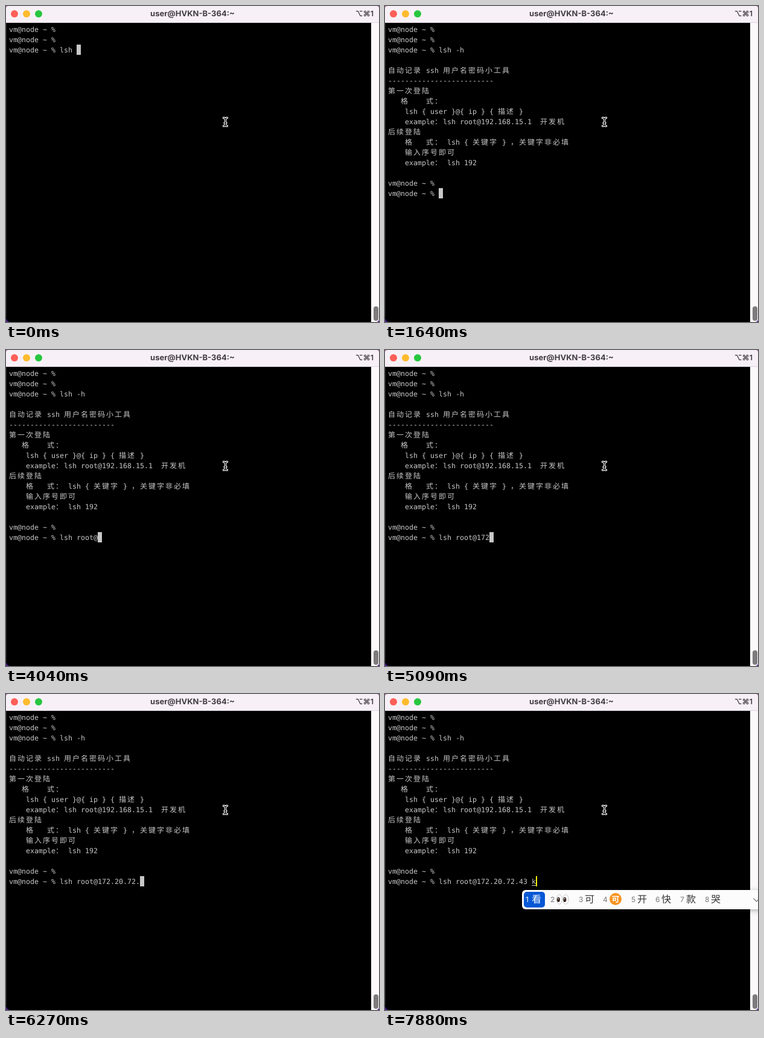
Recreate the animation shown at these times as an HTML page. Size 618 by 524 pixels, loop 8000 ms.

```html
<!DOCTYPE html>
<html lang="zh-CN">
<head>
<meta charset="utf-8">
<title>Terminal</title>
<style>
  html, body { margin: 0; width: 100%; height: 100%; overflow: hidden; background: #000; }
  svg { display: block; }
  text { white-space: pre; text-rendering: geometricPrecision; text-spacing-trim: space-all; }
  .term { font: 11.63px "DejaVu Sans Mono", monospace; fill: #c7c7c7; }
  .wide { font: 12px "Noto Sans CJK SC", "Noto Sans CJK", sans-serif; letter-spacing: 2px; }
  .title { font: 700 13px Inter, sans-serif; fill: #413d42; }
  .keys { font: 600 12.5px Inter, "DejaVu Sans", sans-serif; fill: #413d42; }
  .num { font: 12px Inter, sans-serif; fill: #77777a; }
  .word { font: 16px "Noto Sans CJK SC", "Noto Sans CJK", sans-serif; fill: #343436; }
  .picked { fill: #fff; }
  .popup { filter: drop-shadow(0 2px 4px rgba(0, 0, 0, .3)); }
</style>
</head>
<body>
<svg width="618" height="524" viewBox="0 0 618 524">
  <rect width="618" height="28" fill="#a44ba8"/>
  <rect y="28" width="618" height="496" fill="#4b1c93"/>
  <path d="M0 4Q0 0 4 0H614Q618 0 618 4V28H0Z" fill="#f8f0f7"/>
  <path d="M0 28H605V524H8Q0 524 0 515Z"/>
  <path d="M0.5 28V515" stroke="#242424"/>
  <path d="M0 27.5H618" stroke="#ddd5dc"/>
  <path d="M605 28H618V520Q617 524 613 524H605Z" fill="#fcf9fb"/>
  <rect x="609" y="498" width="8" height="24" rx="4" fill="#7d7b7d"/>
  <circle cx="14" cy="13" r="6" fill="#ff5f57"/>
  <circle cx="34" cy="13" r="6" fill="#febb2e"/>
  <circle cx="54" cy="13" r="6" fill="#28c63f"/>
  <text class="title" x="309" y="17" text-anchor="middle">user@HVKN-B-364:~</text>
  <text class="keys" x="609" y="16.5" text-anchor="end">⌥⌘1</text>

  <g id="screen" class="term"></g>
  <g id="help" class="term"></g>
  <g id="last" class="term"></g>
  <rect id="cursor" width="7" height="17" fill="#c7c7c7"/>

  <g id="ime">
    <path d="M243 317.5h7" stroke="#c7c7c7"/>
    <rect x="250" y="302" width="2" height="17" fill="#fdf800"/>
    <g class="popup">
      <rect x="227" y="325" width="410" height="32" rx="6" fill="#fdfcfd"/>
    </g>
    <rect x="230" y="328" width="35" height="26" rx="5" fill="#0758d6"/>
    <g id="choices"></g>
    <g id="eyes"></g>
    <path d="M610.500 339l5 5 5-5" fill="none" stroke="#858387" stroke-width="1.300"/>
  </g>

  <g fill="none" stroke-linecap="round">
    <path id="beam" d="M360.500 185.500Q363.500 185.500 363.500 188.500Q363.500 185.500 366.500 185.500M363.500 188V196M360.500 199Q363.500 199 363.500 196Q363.500 199 366.500 199M362 194H365" stroke="#fff" stroke-width="3.400"/>
    <use href="#beam" id="beamCore"/>
  </g>
</svg>
<script>
const NS = 'http://www.w3.org/2000/svg';
const LOOP = 8000, LEFT = 5, TOP = 30, CELL = 7, ROW = 17;
const PROMPT = 'vm@node ~ % ';
const $ = id => document.getElementById(id);

function add(parent, tag, attrs, text = '') {
  const node = document.createElementNS(NS, tag);
  for (const key in attrs) node.setAttribute(key, attrs[key]);
  node.textContent = text;
  return parent.appendChild(node);
}

// Wide characters take two cells of the terminal grid.
function print(parent, row, text) {
  const line = add(parent, 'text', { y: TOP + ROW * row + 13 });
  let cell = 0;
  for (const run of text.match(/[\u2e80-\uffef]+|[^\u2e80-\uffef]+/g) || []) {
    const wide = /[\u2e80-\uffef]/.test(run);
    add(line, 'tspan', { x: LEFT + CELL * cell, class: wide ? 'wide' : 'narrow' }, run);
    cell += run.length * (wide ? 2 : 1);
  }
  return line;
}

print($('screen'), 0, PROMPT);
print($('screen'), 1, PROMPT);
const first = print($('screen'), 2, PROMPT).firstChild;
[
  '自动记录 ssh 用户名密码小工具',
  '-'.repeat(25),
  '第一次登陆',
  '   格    式：',
  '    lsh { user }@{ ip } { 描述 }',
  '    example：lsh root@192.168.15.1  开发机',
  '后续登陆',
  '    格   式： lsh { 关键字 } ，关键字非必填',
  '    输入序号即可',
  '    example： lsh 192',
  '',
  PROMPT
].forEach((text, i) => print($('help'), 4 + i, text));
const second = print($('last'), 16, PROMPT).firstChild;

// Candidate list; the second and fourth entries are pictures.
const numberX = [233, 274, 321, 361, 408, 448, 489, 530];
[...'看 可 开快款哭'].forEach((word, i) => {
  const x = numberX[i], picked = i ? '' : ' picked';
  add($('choices'), 'text', { x, y: 345, class: 'num' + picked }, i + 1);
  add($('choices'), 'text', { x: x + 10, y: 346, class: 'word' + picked }, word);
});
add($('choices'), 'circle', { cx: 382, cy: 340, r: 10, fill: '#f7931e' });
add($('choices'), 'text', { x: 382, y: 345, class: 'word picked', 'text-anchor': 'middle', style: 'font-size:13px;font-weight:700' }, '可');
for (const x of [289, 299.5]) {
  add($('eyes'), 'ellipse', { cx: x, cy: 340.5, rx: 4.6, ry: 8, fill: '#fff', stroke: '#b9b9bd', 'stroke-width': .8 });
  add($('eyes'), 'ellipse', { cx: x - 1.6, cy: 341, rx: 2.5, ry: 4, fill: '#38251f' });
  add($('eyes'), 'circle', { cx: x - 2, cy: 339.3, r: .9, fill: '#fff' });
}
$('beamCore').remove();
add($('beam').parentNode, 'path', { d: $('beam').getAttribute('d'), stroke: '#000', 'stroke-width': 1.2 });

// One time per typed character.
const helpKeys = [0, 0, 0, 0, 600, 890];
const loginKeys = [
  2390, 2540, 2840, 3140, 3440, 3590, 3590, 3740, 4040, 4640, 4790,
  5090, 5240, 5390, 5530, 5680, 5830, 5980, 6270, 6420, 6570, 6720
];
const HELP_AT = 1040, ENTER_AT = 1640, IME_AT = 7880;
const typed = (text, keys, t) => text.slice(0, keys.filter(key => key <= t).length);
const show = (id, on) => $(id).style.display = on ? '' : 'none';

function render(t) {
  const helpText = typed('lsh -h', helpKeys, t);
  const loginText = typed('lsh root@172.20.72.43 ', loginKeys, t);
  const composing = t >= IME_AT;
  first.textContent = PROMPT + helpText;
  second.textContent = PROMPT + loginText + (composing ? 'k' : '');
  show('help', t >= HELP_AT);
  show('last', t >= ENTER_AT);
  show('ime', composing);
  show('cursor', !composing);
  const [row, input] = t < HELP_AT ? [2, helpText] : t < ENTER_AT ? [15, ''] : [16, loginText];
  $('cursor').setAttribute('x', LEFT + CELL * (PROMPT.length + input.length));
  $('cursor').setAttribute('y', TOP + ROW * row);
}

const start = performance.now();
function tick() {
  render((performance.now() - start) % LOOP);
  requestAnimationFrame(tick);
}
tick();
</script>
</body>
</html>
```
